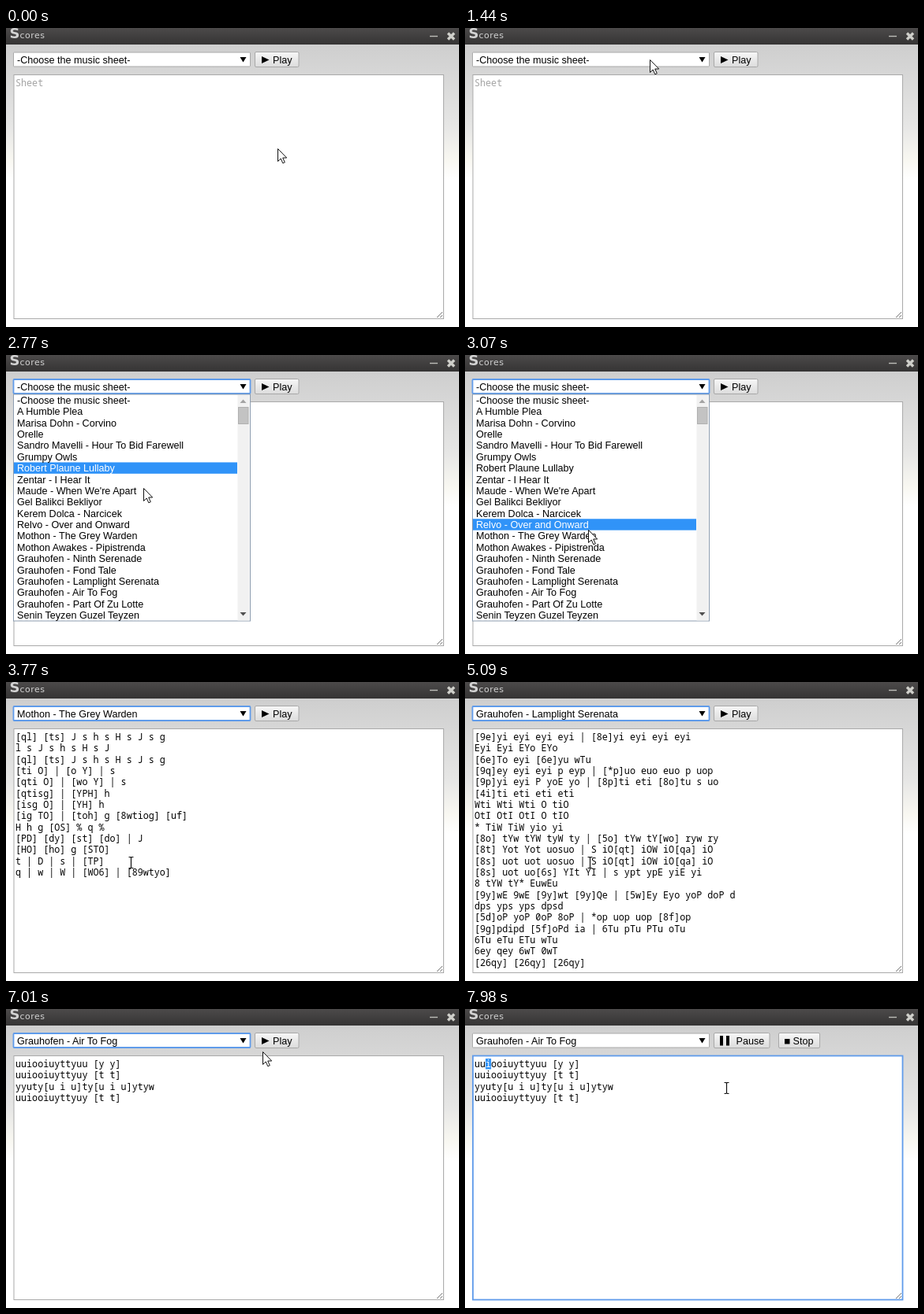
These frames come from a looping animation (574 by 380 pixels, 8 s). An HTML page:

```html
<!DOCTYPE html>
<html lang="en">
<head>
<meta charset="utf-8">
<title>Scores</title>
<style>
  html, body { margin: 0; width: 100%; height: 100%; overflow: hidden; background: #fff; }
  svg { display: block; width: 574px; height: 380px; }
  text { font: 12.6px "Liberation Sans", Arial, sans-serif; fill: #000; white-space: pre; }
  .mono { font: 11.73px "Noto Sans Mono", "DejaVu Sans Mono", monospace; }
  .brand { font: 11px "DejaVu Sans", sans-serif; fill: #d2d2d2; letter-spacing: .5px; }
  .brand .cap { font-size: 18px; font-weight: bold; letter-spacing: 0; }
  .hint { fill: #a4a4a4; }
  .light { fill: #fff; }
  .field { fill: #fff; stroke: #a9a9a9; }
  .field.focus { stroke: #5f9bea; stroke-width: 1.8; }
  .button { fill: url(#face); stroke: #a8a8a8; }
  .button.hover { fill: url(#faceHover); stroke: #8c8c8c; }
  .button.down { fill: #dedede; stroke: #8c8c8c; }
  .mark { fill: #3093f8; }
  .off { display: none; }
</style>
</head>
<body>
<svg viewBox="0 0 574 380">
  <defs>
    <linearGradient id="bar" x2="0" y2="1">
      <stop stop-color="#4c4a4a"/><stop offset="1" stop-color="#353434"/>
    </linearGradient>
    <linearGradient id="page" x2="0" y2="1">
      <stop stop-color="#cecece"/><stop offset=".6" stop-color="#e6e6e5"/>
      <stop offset=".85" stop-color="#f8f7f1"/><stop offset="1" stop-color="#fff"/>
    </linearGradient>
    <linearGradient id="face" x2="0" y2="1">
      <stop stop-color="#f7f7f7"/><stop offset="1" stop-color="#dcdcdc"/>
    </linearGradient>
    <linearGradient id="faceHover" x2="0" y2="1">
      <stop stop-color="#fbfbfb"/><stop offset="1" stop-color="#e4e4e4"/>
    </linearGradient>
  </defs>

  <rect width="574" height="380" fill="#fff"/>
  <rect y="21" width="574" height="172" fill="url(#page)"/>
  <rect width="574" height="21" fill="url(#bar)"/>
  <text class="brand" x="4.5" y="13"><tspan class="cap">S</tspan>cores</text>
  <path d="M537 10.5h10" stroke="#bdbdb8" stroke-width="1.4"/>
  <path d="M560 6.5l8 8m0-8l-8 8" stroke="#cfcfca" stroke-width="3.4"/>

  <rect id="select" class="field" x="9.5" y="31" width="300" height="18" rx="1"/>
  <text id="choice" x="14" y="45"></text>
  <path d="M296.5 37h8l-4 6.5z"/>

  <g id="idle">
    <rect id="play" class="button" x="315.5" y="30.5" width="55.5" height="19" rx="1.5"/>
    <path d="M324 36l9.5 4.5l-9.5 4.5z"/>
    <text x="338" y="45">Play</text>
  </g>
  <g id="running">
    <rect id="pause" class="button" x="315.5" y="30.5" width="70.5" height="19" rx="1.5"/>
    <path d="M323 34h4v12.5h-4zm8 0h4v12.5h-4z"/>
    <text x="343.5" y="45">Pause</text>
    <rect class="button" x="397.5" y="30.5" width="52" height="19" rx="1.5"/>
    <path d="M405 38h6.5v6.5h-6.5z"/>
    <text x="415.5" y="45">Stop</text>
  </g>

  <rect id="area" class="field" x="10" y="59.5" width="544.5" height="310"/>
  <path d="M546 368l7-7m-3 7l3-3" stroke="#777"/>
  <text id="hint" class="mono hint" x="12" y="74">Sheet</text>
  <g id="lines"></g>
  <g id="note">
    <rect class="mark" y="63" width="7.04" height="13.5"/>
    <text class="mono light" y="74"></text>
  </g>

  <g id="menu">
    <rect x="9.5" y="50" width="300" height="288" fill="#fff" stroke="#8d9db0"/>
    <rect x="293.5" y="51" width="15" height="286.5" fill="#f1f1f1"/>
    <rect x="294.5" y="66.5" width="12.5" height="21" fill="#c3c3c3" stroke="#b0b0b0"/>
    <path d="M296.5 61h8l-4-4.5z" fill="#a3a3a3"/>
    <path d="M296.5 327h8l-4 4.5z" fill="#505050"/>
    <rect id="current" class="mark" x="10" width="283" height="14.4"/>
    <g id="rows"></g>
  </g>

  <path id="arrow" d="M.5.5v16l3.7-3.5l2.6 5.8l2.5-1.1l-2.6-5.7h5z" fill="#fff" stroke="#111"/>
  <path id="beam" d="M-3-7h2.2l.8.8l.8-.8H3M0-6V6M-3 7h2.2l.8-.8l.8.8H3" fill="none" stroke="#111" stroke-width="1.2"/>
</svg>

<script>
const LOOP = 8000, ROW = 14.37, LINE = 14.33, CHAR = 7.04;

const titles = [
  "-Choose the music sheet-", "A Humble Plea", "Marisa Dohn - Corvino", "Orelle",
  "Sandro Mavelli - Hour To Bid Farewell", "Grumpy Owls", "Robert Plaune Lullaby",
  "Zentar - I Hear It", "Maude - When We're Apart", "Gel Balikci Bekliyor",
  "Kerem Dolca - Narcicek", "Relvo - Over and Onward", "Mothon - The Grey Warden",
  "Mothon Awakes - Pipistrenda", "Grauhofen - Ninth Serenade", "Grauhofen - Fond Tale",
  "Grauhofen - Lamplight Serenata", "Grauhofen - Air To Fog", "Grauhofen - Part Of Zu Lotte",
  "Senin Teyzen Guzel Teyzen"
];

const scores = {
  12: `[ql] [ts] J s h s H s J s g
l s J s h s H s J
[ql] [ts] J s h s H s J s g
[ti O] | [o Y] | s
[qti O] | [wo Y] | s
[qtisg] | [YPH] h
[isg O] | [YH] h
[ig TO] | [toh] g [8wtiog] [uf]
H h g [OS] % q %
[PD] [dy] [st] [do] | J
[HO] [ho] g [STO]
t | D | s | [TP]
q | w | W | [WO6] | [89wtyo]`,
  13: `[6t] u p s | [6t] u p s
[4q] e t i | [4q] e t i
[8w] t u o | [5w] r y o`,
  14: `o o o [8uf] | i i i [5yd]
o o o u | p p p o | f f f s
o o o u | p p p o | g g f d s
[9y] s s a p | a s d | [5o] o o u | d
s s a p | a s d | o o o u
p p p o | f f f d | g g f d
[8s] d f | [8s] d f | [8us]`,
  15: `[6p] s f f | [6p] s f f d s | [4i] p s s | [4i] p s s a
[8u] o s s | [8u] o s s a p | [5o] a d d
[6p] s f f | [4i] p s s a
[8u] o s d | [5o] a d f
[6p] [4i] [8u] [5o] | [6ps]`,
  16: `[9e]yi eyi eyi eyi | [8e]yi eyi eyi eyi
Eyi Eyi EYo EYo
[6e]To eyi [6e]yu wTu
[9q]ey eyi eyi p eyp | [*p]uo euo euo p uop
[9p]yi eyi P yoE yo | [8p]ti eti [8o]tu s uo
[4i]ti eti eti eti
Wti Wti Wti O tiO
OtI OtI OtI O tIO
* TiW TiW yio yi
[8o] tYw tYW tyW ty | [5o] tYw tY[wo] ryw ry
[8t] Yot Yot uosuo | S iO[qt] iOW iO[qa] iO
[8s] uot uot uosuo | S iO[qt] iOW iO[qa] iO
[8s] uot uo[6s] YIt YI | s ypt ypE yiE yi
8 tYW tY* EuwEu
[9y]wE 9wE [9y]wt [9y]Qe | [5w]Ey Eyo yoP doP d
dps yps yps dpsd
[5d]oP yoP 0oP 8oP | *op uop uop [8f]op
[9g]pdipd [5f]oPd ia | 6Tu pTu PTu oTu
6Tu eTu ETu wTu
6ey qey 6wT 0wT
[26qy] [26qy] [26qy]`,
  17: `uuiooiuyttyuu [y y]
uuiooiuyttyuy [t t]
yyuty[u i u]ty[u i u]ytyw
uuiooiuyttyuy [t t]`
};

// [time, title index]
const picks = [[0, 0], [3610, 12], [3900, 13], [4130, 14], [4290, 15], [5090, 16], [5550, 17]];

// [time, x, y]: pointer tip, eased between stops
const path = [
  [0, 344, 153], [460, 344, 153], [1260, 242, 53], [1290, 242, 53], [1440, 234, 40],
  [2199, 234, 40], [2200, 233, 41], [2400, 233, 41], [2770, 174, 169], [3160, 155, 225],
  [3220, 155, 225], [3250, 157, 228], [3610, 157, 228], [3640, 158, 229], [6410, 158, 229],
  [7010, 325, 54], [7190, 330, 41], [7830, 330, 41], [7980, 331, 100], [LOOP, 331, 100]
];
const smooth = u => u * u * (3 - 2 * u);
const easeOut = u => u * (2 - u);
const swing = u => Math.sin(u * Math.PI / 2) ** 1.3;
const easing = { 460: smooth, 2770: easeOut, 6410: swing, 7010: easeOut };

const el = id => document.getElementById(id);
const show = (id, on) => el(id).classList.toggle("off", !on);
const mark = (id, name, on) => el(id).classList.toggle(name, on);

function addText(parent, text, x, y, className = "") {
  const node = document.createElementNS("http://www.w3.org/2000/svg", "text");
  node.setAttribute("x", x);
  node.setAttribute("y", y);
  node.setAttribute("class", className);
  node.textContent = text;
  parent.append(node);
  return node;
}

const rows = titles.map((title, i) => addText(el("rows"), title, 14, 62 + ROW * i));

function pointerAt(t) {
  const i = Math.max(1, path.findIndex(p => p[0] > t));
  const [t0, x0, y0] = path[i - 1], [t1, x1, y1] = path[i];
  const u = (t - t0) / (t1 - t0), k = (easing[t0] || (v => v))(u);
  return [Math.round(x0 + (x1 - x0) * k), Math.round(y0 + (y1 - y0) * k)];
}

let shown = -1;
function pick(index) {
  if (index === shown) return;
  shown = index;
  el("choice").textContent = titles[index];
  el("lines").replaceChildren();
  (scores[index] || "").split("\n").forEach((line, i) =>
    addText(el("lines"), line, 12, 74 + LINE * i, "mono"));
  show("hint", !scores[index]);
}

function draw(t) {
  pick(picks.filter(p => p[0] <= t).pop()[1]);

  const open = t >= 1770 && t < 3610;
  const playing = t >= 7430;
  show("menu", open);
  mark("select", "focus", t >= 1770 && !playing);
  mark("area", "focus", playing);
  show("idle", !playing);
  show("running", playing);

  const [x, y] = pointerAt(t);
  const overButton = x > 315 && x < 371 && y > 30 && y < 50;
  mark("play", "hover", overButton);
  mark("play", "down", t >= 7290 && !playing);
  mark("pause", "hover", overButton);

  // the highlighted row trails the pointer slightly
  if (open) {
    const trail = pointerAt(t - 75)[1];
    const row = Math.max(0, Math.floor((trail - 50.2) / ROW));
    el("current").setAttribute("y", 50.2 + ROW * row);
    rows.forEach((node, i) => node.classList.toggle("light", i === row));
  }

  show("note", playing);
  if (playing) {
    const n = Math.floor((t - 7430) / 200);
    const [box, letter] = el("note").children;
    box.setAttribute("x", 12 + CHAR * n);
    letter.setAttribute("x", 12 + CHAR * n);
    letter.textContent = scores[17][n];
  }

  const overText = !open && x > 10 && x < 554 && y > 59 && t > 3600;
  show("arrow", !overText);
  show("beam", overText);
  el(overText ? "beam" : "arrow").setAttribute("transform",
    overText ? `translate(${x + .5} ${y + .5})` : `translate(${x} ${y})`);
}

const start = performance.now();
function tick() {
  draw((performance.now() - start) % LOOP);
  requestAnimationFrame(tick);
}
tick();
</script>
</body>
</html>
```
